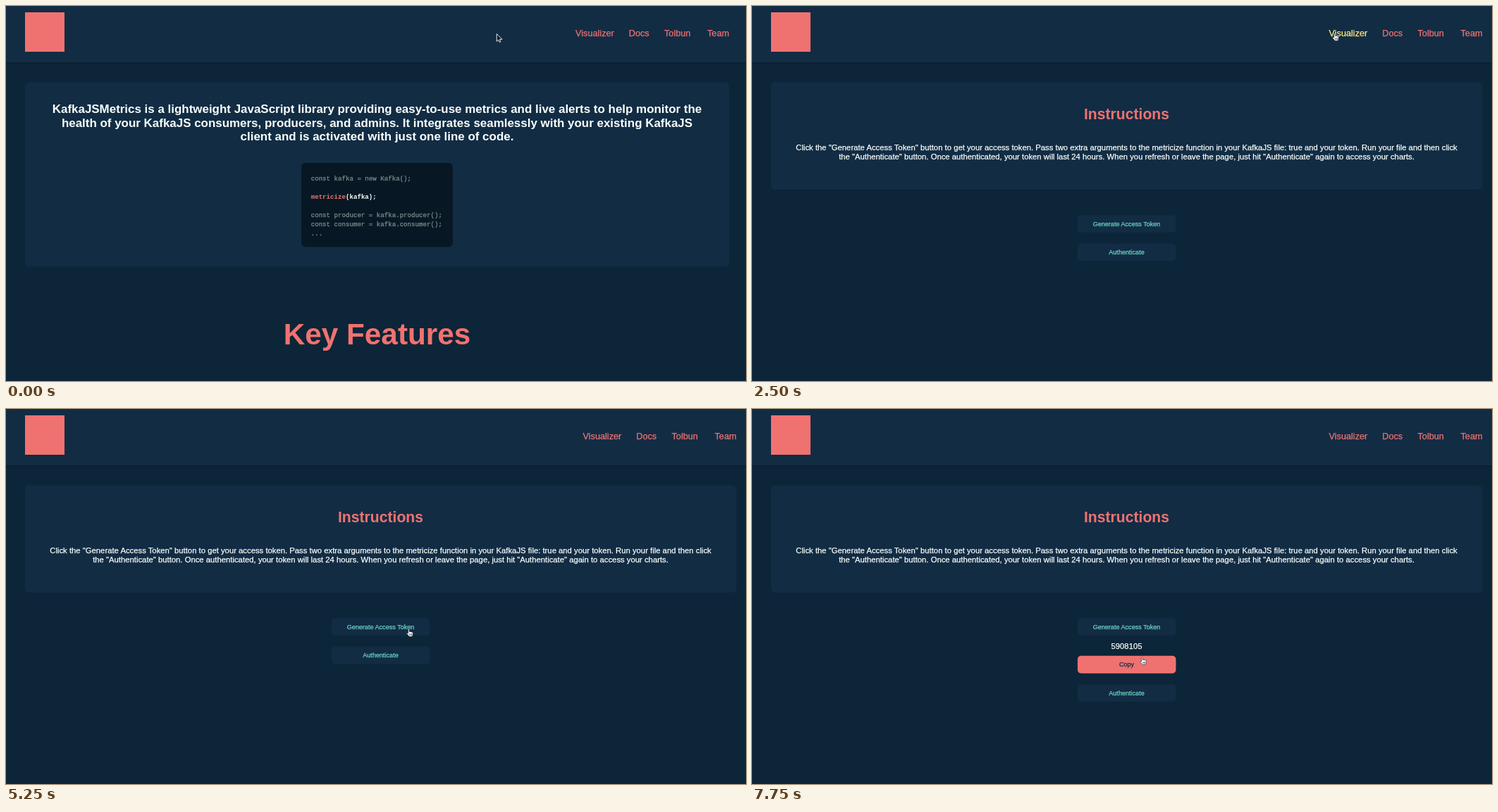
Write an HTML page that moves like this. It is 1050 px wide and 533 px high and loops after 8 s.

```html
<!DOCTYPE html>
<html lang="en">
<head>
<meta charset="utf-8">
<title>KafkaJSMetrics</title>
<style>
  html, body { margin: 0; width: 100%; height: 100%; overflow: hidden; background: #0d2538; }
  svg { display: block; width: 1050px; height: 533px; fill: currentColor; font-family: "Liberation Sans", Arial, sans-serif; }
  text { white-space: pre; stroke: currentColor; stroke-width: .25px; }
  .panel { fill: #122c44; }
  .coral { color: #f07270; }
  .light { color: #f9fffb; }
  .mid { text-anchor: middle; }
  .bold { font-weight: bold; }
  .bold, .bold text { stroke: none; }
  .nav { font-size: 12.7px; color: #f07270; }
  .nav .hover { color: #fce77a; }
  .lead { font-size: 16.95px; }
  .body { font-size: 11.3px; }
  .button { font-size: 9.08px; color: #6dd3c2; }
  .code { font: 9.15px "Liberation Mono", "Courier New", monospace; color: #7f8c8e; }
  .copy { color: #122c44; }
</style>
</head>
<body>
<svg viewBox="0 0 1050 533">
  <defs>
    <linearGradient id="shade" x2="0" y2="1">
      <stop stop-color="#091d2d" stop-opacity=".8"/>
      <stop offset="1" stop-color="#0d2538" stop-opacity="0"/>
    </linearGradient>
  </defs>
  <rect width="1050" height="533" fill="#0d2538"/>
  <rect class="panel" width="1050" height="80"/>
  <rect y="80" width="1050" height="4" fill="url(#shade)"/>
  <rect class="coral" x="27" y="9" width="56" height="56"/>
  <g id="nav" class="nav">
    <text id="link" x="808" y="42.7">Visualizer</text>
    <text x="883.8" y="42.7">Docs</text>
    <text x="934" y="42.7">Tolbun</text>
    <text x="995" y="42.7">Team</text>
  </g>

  <g id="home">
    <rect class="panel" x="27" y="108.5" width="999" height="262" rx="6"/>
    <g class="lead bold light mid">
      <text x="526.5" y="152.3">KafkaJSMetrics is a lightweight JavaScript library providing easy-to-use metrics and live alerts to help monitor the</text>
      <text x="526.5" y="171.8">health of your KafkaJS consumers, producers, and admins. It integrates seamlessly with your existing KafkaJS</text>
      <text x="526.5" y="191.3">client and is activated with just one line of code.</text>
    </g>
    <rect x="419" y="223" width="215" height="119.5" rx="6" fill="#071824"/>
    <g class="code">
      <text x="432.7" y="248">const kafka = new Kafka();</text>
      <text x="432.7" y="274" class="bold light"><tspan class="coral">metricize</tspan>(kafka);</text>
      <text x="432.7" y="300">const producer = kafka.producer();</text>
      <text x="432.7" y="313">const consumer = kafka.consumer();</text>
      <text x="432.7" y="326">...</text>
    </g>
    <text class="coral bold mid" x="526.5" y="480.5" font-size="42.3">Key Features</text>
  </g>

  <g id="tool">
    <rect class="panel" x="27" y="108.5" width="1009.5" height="152.5" rx="6"/>
    <text class="coral bold mid" x="531.5" y="160.8" font-size="21.15">Instructions</text>
    <g class="body light mid">
      <text x="531.5" y="205.2">Click the "Generate Access Token" button to get your access token. Pass two extra arguments to the metricize function in your KafkaJS file: true and your token. Run your file and then click</text>
      <text x="531.5" y="218.3">the "Authenticate" button. Once authenticated, your token will last 24 hours. When you refresh or leave the page, just hit "Authenticate" again to access your charts.</text>
    </g>
    <g class="button mid">
      <rect class="panel" x="462" y="297.3" width="139.5" height="24.5" rx="5"/>
      <text x="531.5" y="312.7">Generate Access Token</text>
      <g id="auth">
        <rect class="panel" x="462" y="337.8" width="139.5" height="24.5" rx="5"/>
        <text x="531.5" y="353.2">Authenticate</text>
      </g>
    </g>
    <g id="token" class="mid">
      <text class="body light" x="531.5" y="340.7">5908105</text>
      <rect class="coral" x="462" y="350.8" width="139.5" height="25" rx="5"/>
      <text class="button copy" x="531.5" y="366.4">Copy</text>
    </g>
  </g>

  <g id="cursor" stroke-linejoin="round" stroke-linecap="round">
    <path id="arrow" d="M.8 1V11.3L3.2 9.1 4.7 12.5 6.4 11.8 5 8.4H8Z" fill="#0b1620" stroke="#fff" stroke-width=".9"/>
    <g id="hand" stroke="#0a1722" stroke-width=".6">
      <path d="M2.5 1.5Q3.4.1 4.2 1.5V4.6Q5.2 3.9 6 4.7Q7 4.2 7.7 5.1Q9 4.8 9.4 6.2Q9.5 9 8.4 11.5H4Q2.6 9.4.6 7.3Q.7 5.8 2.5 6.9Z" fill="#fff"/>
      <path d="M4.7 7.6V9.8M6.1 7.6V9.8M7.5 7.6V9.8" fill="none"/>
    </g>
    <g id="beam" fill="none">
      <path id="stem" d="M.4.6Q2.6.6 2.6 2.4V9.8Q2.6 11.6.4 11.6M4.8.6Q2.6.6 2.6 2.4M4.8 11.6Q2.6 11.6 2.6 9.8M1.4 7.8H3.8"/>
      <use href="#stem" stroke="#0a1722" stroke-width="2"/>
      <use href="#stem" stroke="#fff" stroke-width=".9"/>
    </g>
  </g>
</svg>
<script>
  const LOOP = 8000;
  const $ = id => document.getElementById(id);
  const show = (id, on) => $(id).style.display = on ? '' : 'none';

  // The pointer jumps: start time, shape, left, top
  const steps = [
    [0, 'arrow', 695.5, 39], [250, 'arrow', 699.5, 40], [500, 'arrow', 700.5, 40],
    [750, 'arrow', 733, 39], [1000, 'arrow', 737.5, 39], [1250, 'arrow', 749.5, 39],
    [1500, 'hand', 804, 40], [1750, 'hand', 823, 38], [3250, 'hand', 821, 39.5],
    [3500, 'arrow', 790, 61.5], [3750, 'arrow', 763.5, 80], [4000, 'arrow', 714.5, 120],
    [4250, 'arrow', 661.5, 167], [4500, 'beam', 619.5, 210], [4750, 'arrow', 602, 267],
    [5000, 'hand', 580.5, 297.5], [5250, 'hand', 568, 312], [7000, 'hand', 563, 319],
    [7250, 'arrow', 560, 331], [7500, 'arrow', 557, 342], [7750, 'hand', 550, 352]
  ];

  function draw(t) {
    const onTool = t >= 2500, hasToken = t >= 6250;
    show('home', !onTool);
    show('tool', onTool);
    show('token', hasToken);
    $('nav').setAttribute('transform', `translate(${onTool ? 10.5 : 0})`);
    $('auth').setAttribute('transform', `translate(0 ${hasToken ? 53.7 : 0})`);
    $('link').classList.toggle('hover', t >= 1500 && t < 3500);

    const [, shape, x, y] = steps.findLast(s => s[0] <= t);
    for (const id of ['arrow', 'hand', 'beam']) show(id, id === shape);
    $('cursor').setAttribute('transform', `translate(${x} ${y})`);
  }

  const start = performance.now();
  function tick() {
    draw((performance.now() - start) % LOOP);
    requestAnimationFrame(tick);
  }
  tick();
</script>
</body>
</html>
```
